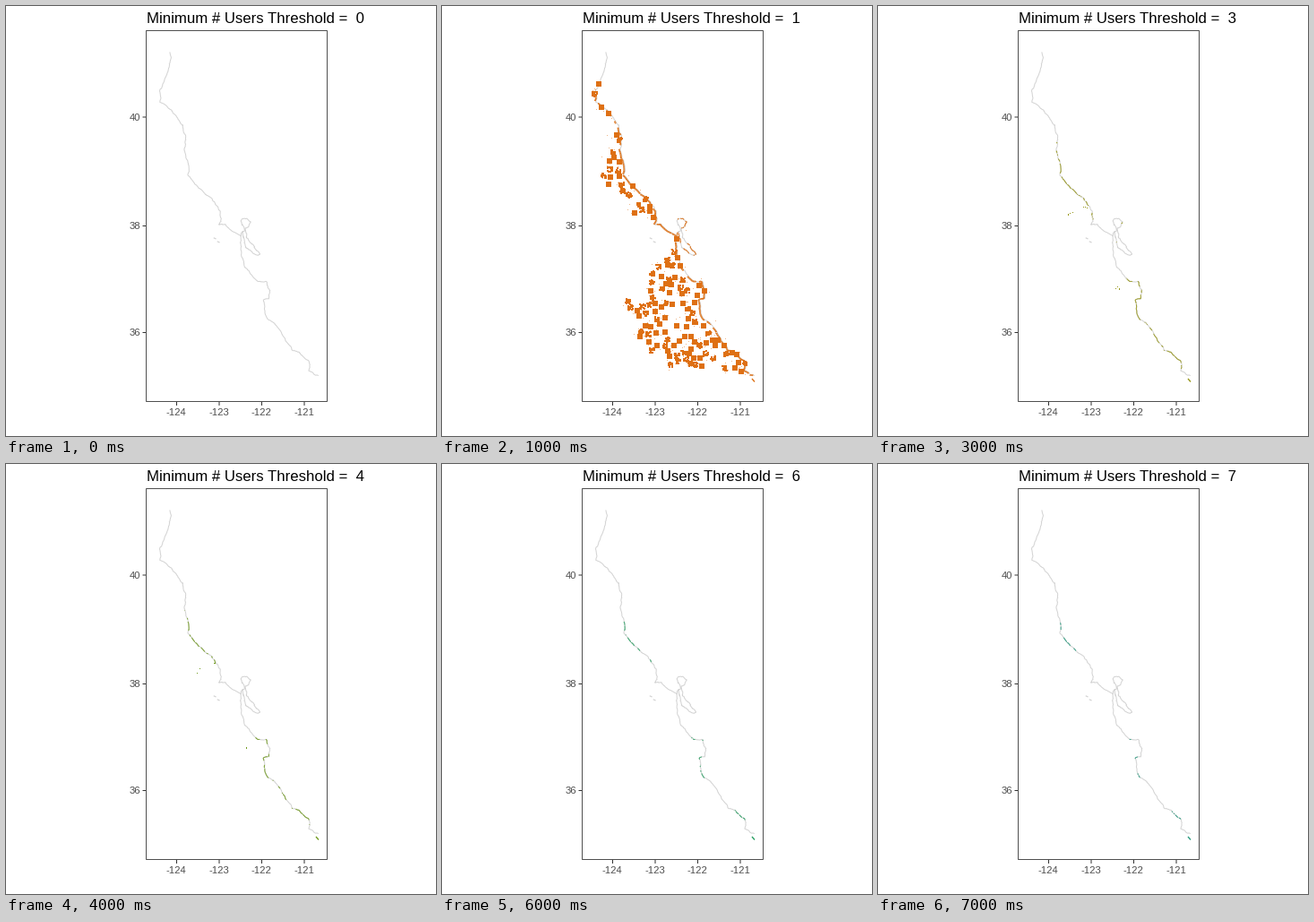
A matplotlib script that plays this animation: 480x480 px, repeating every 8000 ms.

```python
import numpy as np
import matplotlib.pyplot as plt
from matplotlib.animation import FuncAnimation
from matplotlib.collections import LineCollection
from matplotlib.patches import Rectangle

SIZE, DPI = 480, 72
plt.rcParams["font.family"] = "Liberation Sans"

# Corners of the shoreline and of the bay, roughened when drawn.
COAST = np.array([
    (183, 52), (185, 60), (178, 80), (172, 95), (173, 107), (186, 118),
    (197, 133), (201, 150), (199, 162), (205, 181), (203, 189), (215, 203),
    (233, 219), (239, 230), (240, 238), (238, 245), (245, 244), (250, 250),
    (262, 257), (262, 272), (266, 290), (276, 303), (281, 308), (290, 307),
    (295, 318), (293, 326), (287, 328), (289, 339), (290, 347), (303, 358),
    (312, 373), (320, 384), (327, 387), (338, 397), (340, 403), (337.5, 407),
    (349, 413.5)])
BAY = np.array([
    (262, 257), (266, 251), (262, 240), (267, 237), (273, 242), (267, 249),
    (269, 259), (284, 278), (278, 277), (267, 269), (264, 250)])
TIP = np.array([(346, 416), (349, 419.5)])

# Offshore cells that more than one user visits.
SOLID = [(227, 343), (297, 365), (307, 372), (314, 378), (255, 400)]
TORN = [(231, 223), (214, 230), (266, 314), (273, 317), (286, 311),
        (250, 331), (230, 366), (277, 382)]

# Popular stretches of shore: height on the stage, spread, extra users.
POPULAR = [(194, 22, 6.5), (307.5, 3, 5), (344, 24, 6.5), (391, 9, 5.5)]
COLORS = [None, "#de7014", "#c08400", "#98981c", "#729c20", "#42a03a",
          "#28a062", "#2a9c80"]

rng = np.random.default_rng(7)


def bump(y, centre, spread):
    return np.exp(-((y - centre) / spread) ** 2)


def smooth(shape, scale):
    """Seeded noise that varies over a few steps, with the given spread."""
    raw = rng.normal(0, scale, shape)
    kernel = np.ones(4) / 2
    return np.apply_along_axis(np.convolve, 0, raw, kernel, mode="same")


def rough(corners, jitter):
    """Resample a path at about one pixel and roughen it."""
    dist = np.r_[0, np.cumsum(np.hypot(*np.diff(corners, axis=0).T))]
    t = np.arange(0, dist[-1], 0.9)
    path = np.c_[np.interp(t, dist, corners[:, 0]),
                 np.interp(t, dist, corners[:, 1])]
    return path + smooth(path.shape, jitter)


def pieces(path):
    return np.stack([path[:-1], path[1:]], axis=1)


def offshore(count):
    """Scatter cells in a strip west of the coast, without overlaps."""
    coast_y = np.maximum.accumulate(COAST[:, 1])
    cells = [np.array(p, float) for p in SOLID + TORN]
    while len(cells) < count:
        x, y = rng.uniform((165, 85), (345, 408))
        reach = 4 + 26 * bump(y, 195, 35) + 86 / (1 + np.exp((300 - y) / 12))
        edge = np.interp(y, coast_y, COAST[:, 0])
        apart = np.abs(np.array(cells) - (x, y)).max(axis=1).min()
        if edge - reach < x < edge and apart > 5:
            cells.append(np.array([x, y]))
    return np.array(cells)


fig = plt.figure(figsize=(SIZE / DPI, SIZE / DPI), dpi=DPI, facecolor="white")
ax = fig.add_axes([0, 0, 1, 1])
ax.set(xlim=(0, SIZE), ylim=(SIZE, 0))
ax.axis("off")

ax.add_patch(Rectangle((156.5, 27.5), 202, 414, fill=False, ec="#505050",
                       lw=1, snap=False, zorder=9))
tick = dict(color="#333333", lw=1, snap=False)
text = dict(size=11.2, color="#4d4d4d")
for i in range(4):
    x = 190.5 + 47.5 * i
    ax.plot([x, x], [442, 445.5], **tick)
    ax.text(x - 0.5, 457, str(i - 124), ha="center", **text)
for label, y in ((40, 124), (38, 245.5), (36, 364.5)):
    ax.plot([153, 156.5], [y, y], **tick)
    ax.text(150.5, y + 3.5, str(label), ha="right", **text)
title = ax.text(157, 19, "", size=16.8, color="black")

coast, bay = rough(COAST, 0.4), rough(BAY, 0.55)
for path in (coast, bay):
    ax.plot(*path.T, color="#d3d3d3", lw=1)
for x, y in ((233, 259), (237, 263)):
    ax.plot([x - 0.7, x + 1], [y, y + 0.8], color="#d3d3d3", lw=1.2)

shore = pieces(coast)
shore_y = shore[:, 0, 1]
shore_use = 1.3 / (1 + np.exp((100 - shore_y) / 8))
shore_use += sum(peak * bump(shore_y, c, w) for c, w, peak in POPULAR)
shore_use *= 1 + smooth(len(shore), 0.5)
bay_use = 0.7 + smooth(len(bay) - 1, 0.8)
cells = offshore(125)


def specks(points, color, size=1.0, alpha=1.0):
    points = np.floor(np.reshape(points, (-1, 2))) + 0.5
    return ax.scatter(*points.T, s=size ** 2, marker="s", c=color, lw=0,
                      alpha=alpha, zorder=4)


def lines(segments, color, width):
    return ax.add_collection(
        LineCollection(segments, colors=color, linewidths=width, zorder=3))


def torn(centres, count):
    """Random specks inside the square around each centre."""
    centres = np.repeat(centres, count, axis=0)
    return centres + rng.uniform(-2.7, 2.7, centres.shape)


def layer(k):
    """All marks of the cells with at least k users."""
    color = COLORS[k]
    width, shift = (1.8, -1.1) if k == 1 else (1, -0.2)
    art = [lines(shore[shore_use >= k] + (shift, 0), color, width),
           lines(pieces(TIP), color, 1.4)]
    if k <= 3:
        art.append(lines(pieces(bay)[bay_use >= 0.35 + 0.65 * k], color, 1.1))
    if k == 1:
        ragged = rng.random(len(cells)) < 0.35
        art.append(specks(cells[~ragged], color, 6))
        art.append(specks(torn(cells[ragged], 22), color, 1.5))
        near = np.repeat(cells, 2, axis=0)
        near += rng.normal(0, 4.5, near.shape)
        art.append(specks(near, color, 1, 0.5))
    elif k == 2:
        art.append(specks(SOLID, color, 5.5))
        art.append(specks(torn(TORN, 18), color, 1.5))
        stray = cells[rng.integers(0, len(cells), 30)]
        art.append(specks(stray + rng.normal(0, 2, stray.shape), color, 1, .5))
    elif k <= 5:
        art.append(specks(torn(TORN[:3], 40 // k ** 2), color))
    return art


layers = [[]] + [layer(k) for k in range(1, 8)]


def update(frame):
    title.set_text(f"Minimum # Users Threshold =  {frame}")
    for k, art in enumerate(layers):
        for artist in art:
            artist.set_visible(k == frame)
    return [title]


anim = FuncAnimation(fig, update, frames=8, interval=1000, repeat=True,
                     repeat_delay=0, blit=False)
plt.show()
```
